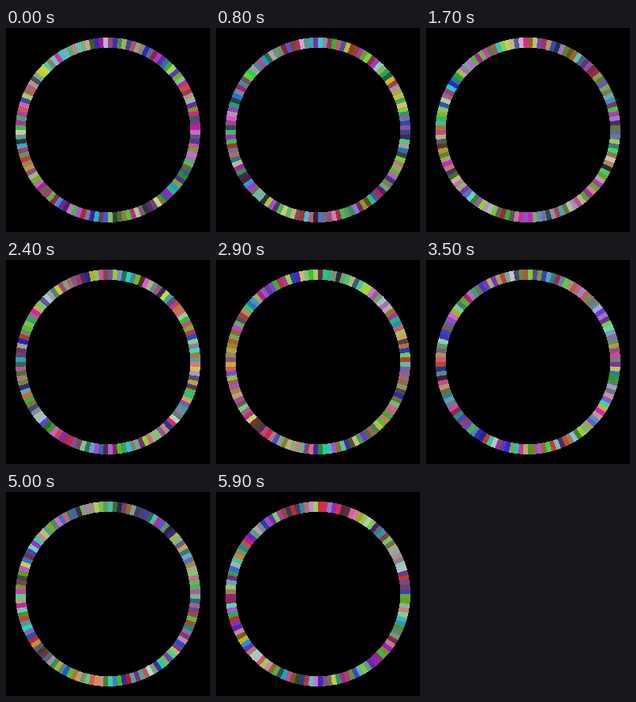
Animation of 256 by 256 pixels, one loop 6 s. Source, as an HTML page:

```html
<!DOCTYPE html>
<html>
<head>
<meta charset="utf-8">
<style>
  html, body { margin: 0; width: 100%; height: 100%; overflow: hidden; background: #000; }
  svg { display: block; }
</style>
</head>
<body>
<svg id="stage" width="256" height="256" viewBox="-128 -128 256 256" shape-rendering="crispEdges"></svg>
<script>
const stage = document.getElementById('stage');
const LOOP = 6000, STEP = 100;
const SEGMENTS = 120, INNER = 103.2, OUTER = 116;
const ARC = 2 * Math.PI / SEGMENTS;

function point(radius, index) {
  const angle = index * ARC - Math.PI / 2;
  return `${radius * Math.cos(angle)},${radius * Math.sin(angle)}`;
}

const blocks = Array.from({ length: SEGMENTS }, (_, i) => {
  const block = document.createElementNS('http://www.w3.org/2000/svg', 'polygon');
  block.setAttribute('points',
    [point(INNER, i), point(OUTER, i), point(OUTER, i + 1), point(INNER, i + 1)].join(' '));
  return stage.appendChild(block);
});

// Small seeded generator (mulberry32)
function seeded(seed) {
  return () => {
    seed = (seed + 0x6d2b79f5) | 0;
    let t = Math.imul(seed ^ (seed >>> 15), 1 | seed);
    t = (t + Math.imul(t ^ (t >>> 7), 61 | t)) ^ t;
    return ((t ^ (t >>> 14)) >>> 0) / 4294967296;
  };
}

function recolor(step) {
  const random = seeded(step * 7919 + 17);
  const channel = () => Math.floor(30 + random() * 185);
  for (const block of blocks) {
    block.setAttribute('fill', `rgb(${channel()}, ${channel()}, ${channel()})`);
  }
}

const startTime = performance.now();
let shown = -1;
function tick() {
  const step = Math.floor(((performance.now() - startTime) % LOOP) / STEP);
  if (step !== shown) recolor(shown = step);
  requestAnimationFrame(tick);
}
tick();
</script>
</body>
</html>
```
